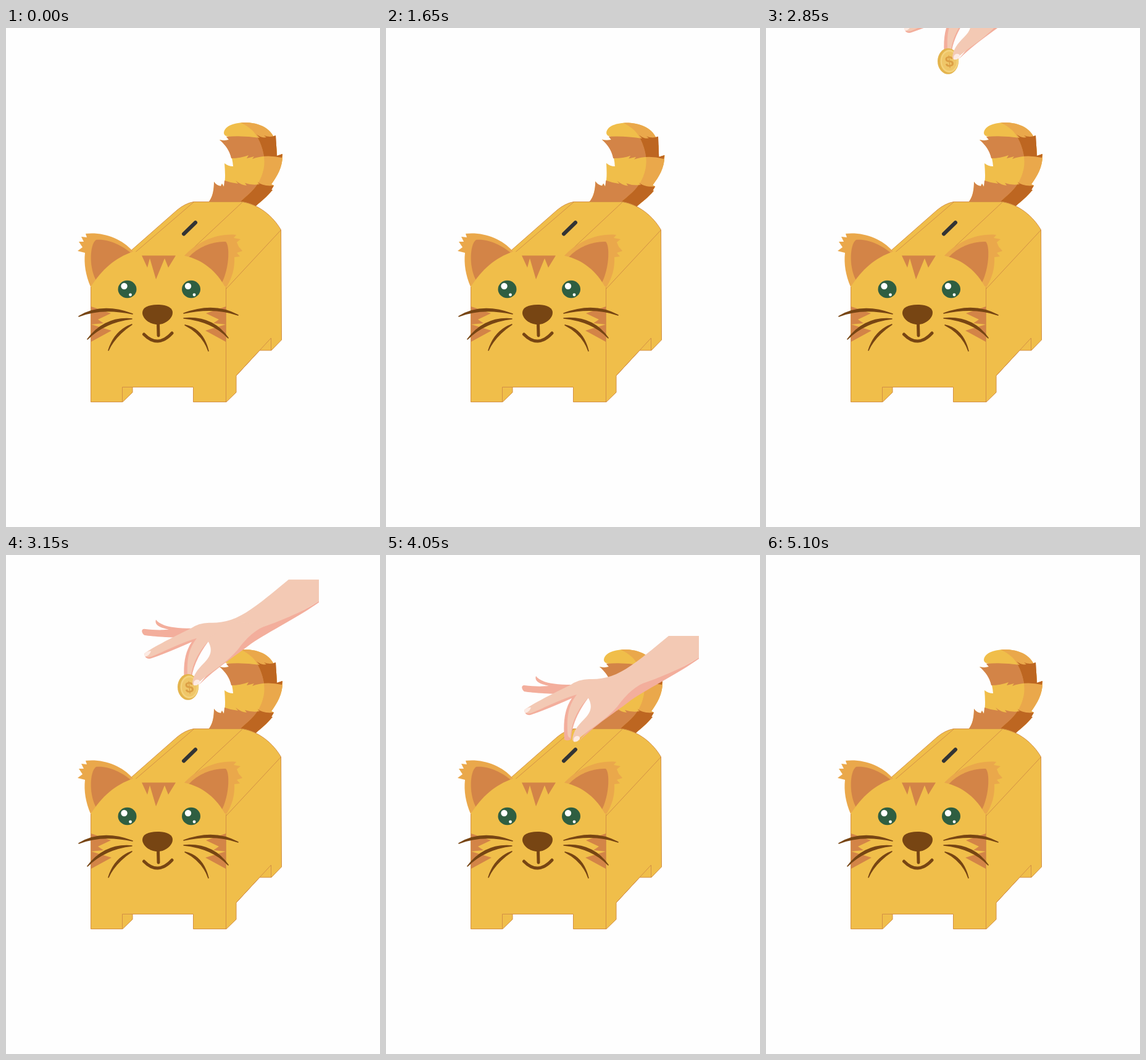
Write an HTML page that moves like this. It is 606 by 808 pixels and loops after 5250 ms.

```html
<!DOCTYPE html>
<html lang="en">
<head>
<meta charset="utf-8">
<title>Cat money box</title>
<style>
  html, body { margin: 0; width: 100%; height: 100%; overflow: hidden; background: #fefefe; }
  svg { display: block; width: 100vw; height: 100vh; }
  .fur { fill: #f0be4a; }
  .edge { fill: #eaa84b; }
  .stripe { fill: #d38447; }
  .dark { fill: #bd6621; }
  .line { fill: none; stroke: #d38f45; stroke-width: 1; }
  .brown { fill: #774513; }
  .mouth { fill: none; stroke: #774513; stroke-width: 5; stroke-linecap: round; }
  .skin { fill: #f3c9b4; }
  .pink { fill: #f3ae9c; }
  .nail { fill: #fdebe4; }
</style>
</head>
<body>
<svg viewBox="0 0 606 808">
  <defs>
    <clipPath id="shade">
      <path d="M373 150 C397 160 405 170 411 184 C420 205 421 222 414 240 C406 260 394 268 379 282 L360 310 H470 V150Z"/>
    </clipPath>
    <path id="tailShape" d="M353 170 C354 158 371 153 389 153 C417 154 435 167 438 190 L439 207 L448 204 C449 224 440 239 430 253 L434 255 L430 262 L432 262 C422 274 414 280 405 288 L392 306 H326 L329 292 L318 288 L329 281 C335 273 337 262 337 249 Q341 255 348 256 L350 252 L353 257 C356 245 355 232 354 219 Q360 224 368 224 C367 206 360 192 346 181 Q353 183 361 181 L357 176 L361 176 Q353 175 353 170Z"/>
    <path id="bandTop" d="M346 181 Q353 183 361 181 L357 176 Q385 174 411 178 L406 172 Q414 179 422 177 L418 174 Q428 178 437 174 L439 207 L448 204 L447 210 Q420 204 399 212 L402 208 L390 211 L393 206 Q380 211 365 211 C362 198 356 190 346 181Z"/>
    <path id="bandLow" d="M318 288 L329 281 C335 273 337 262 337 249 Q341 255 348 256 L350 252 L353 257 L354 247 Q365 251 376 252 L372 247 Q380 254 390 255 L387 251 Q398 255 411 253 L407 249 Q417 257 434 255 L430 262 L432 262 C422 274 414 280 405 288 L392 306 H320Z"/>
    <g id="eye">
      <ellipse rx="15" ry="14.3" fill="#2f5e41"/>
      <circle cx="-5" cy="-5" r="5.2" fill="#fff"/>
      <circle cx="5" cy="9" r="2.4" fill="#fff"/>
    </g>
  </defs>

  <g id="tail">
    <use href="#tailShape" class="fur"/>
    <use href="#bandTop" class="stripe"/>
    <use href="#bandLow" class="stripe"/>
    <g clip-path="url(#shade)">
      <use href="#tailShape" class="edge"/>
      <use href="#bandTop" class="dark"/>
      <use href="#bandLow" class="dark"/>
    </g>
  </g>

  <g id="box">
    <path class="fur" d="M203 360 L277 295 Q290 284 304 281.500 H383 C410 286 433 305 445.500 327 L446.500 505 L430 522 H411 L373 563 V590 L357 605.500 H303.500 V581.500 H205 V590 L189 605.500 H137.500 V419 L180 372Z"/>
    <path class="line" d="M203 360 L277 295 Q290 284 304 281.500 H383 C410 286 433 305 445.500 327 L446.500 505 L430 522 H411 L373 563 V590 L357 605.500 H303.500 V581.500 H188.500 V605.500 H137.500 V419 M205 581.500 V590 L189 605.500 M205 367 L304 282 M290 369 L383 282 M357 422 L445.500 327 M356.500 420 V605 M429.500 522 V502 L373 563"/>
    <path d="M288 333.500 L307 315" stroke="#333435" stroke-width="6" stroke-linecap="round"/>
  </g>

  <g id="ears">
    <path class="edge" d="M137 419 C129 400 126 382 128 364 L116 361 L124 355 L118 346 L126 346 L122 338 L131 339 L129 333 C157 330 187 340 206 362 L180 385Z"/>
    <path class="stripe" d="M148 412 C134 392 135 350 146 343 C165 341 188 352 202 364 L175 395Z"/>
    <path class="edge" d="M288 370 C309 347 340 332 373 335 L369 340 L380 342 L374 347 L377 354 L383 361 L374 364 L379 370 L370 371 C371 390 366 405 357 420 L325 395Z"/>
    <path class="stripe" d="M296 371 C312 354 335 345 356 346 C363 352 362 390 349 414 L320 398Z"/>
  </g>

  <g id="face">
    <path class="fur" d="M137.500 419 C155 391 177 372 206 362 L290 369 C318 375 341 393 356.500 422 V500 H137.500Z"/>
    <path class="stripe" d="M220 368.500 H275 L263 388 L257 373 L243 407 L233 373 L229 388Z"/>
    <path class="stripe" d="M138 451 L170 462 L149 472 L158 478 L138 480ZM138 480 L171 490 L138 508Z"/>
    <path class="stripe" d="M356 451 L324 462 L345 472 L336 478 L356 480ZM356 480 L323 490 L356 508Z"/>
    <path class="line" d="M137.500 419 V510 M356.500 422 V510"/>
    <use href="#eye" x="196.500" y="423"/>
    <use href="#eye" x="300" y="423"/>
    <path class="brown" d="M245.500 448 C261 448 270 453 270 461 C270 470 259 480 245.500 480 C232 480 221 470 221 461 C221 453 230 448 245.500 448Z"/>
    <path class="mouth" d="M246.500 478 L247 498 M223.500 496 Q246 519 269 494"/>
    <g id="whiskers" class="brown"></g>
  </g>

  <g id="hand">
    <path class="pink" d="M243 104 C249 113 268 118 300 118 L276 133 C253 132 235 131 224 129 C219 125 219 119 224 119 C240 121 253 121 264 120 C249 117 240 112 243 104Z"/>
    <path class="pink" d="M225 160 C224 164 228 168 234 167 C256 160 280 149 301 140 C289 158 287 178 289 207 Q295 210 300 206 C301 184 311 162 328 139 L302 118Z"/>
    <path class="skin" d="M458 39 H507 V74 C470 97 430 112 400 132 L340 160 L328 139 C312 155 300 178 299 204 Q294 205 294 193 C293 170 295 153 309 134 C290 139 259 154 235 164 Q224 166 224 159 C237 149 275 130 298 119 Q312 109 329 109 C352 110 373 104 397 87 C423 69 438 55 458 39Z"/>
    <path class="nail" d="M224 159 Q231 154 235 155 Q232 163 225 164Z"/>
    <g id="coin">
      <ellipse cx="295" cy="213" rx="17" ry="21" fill="#e4b44d"/>
      <ellipse cx="297" cy="213" rx="14.500" ry="18.500" fill="#f4d27c"/>
      <ellipse cx="297" cy="213" rx="12" ry="15.500" fill="#efc668"/>
      <text x="297" y="222" text-anchor="middle" font-family="Arial, 'Liberation Sans', sans-serif" font-size="25" font-weight="bold" fill="#dc9f45" transform="rotate(-6 297 213)">$</text>
    </g>
    <path class="pink" d="M507 74 V76 C475 99 428 122 397 143 C373 162 344 179 311 211 L350 165 C376 148 388 126 410 118 C445 106 475 94 507 74Z"/>
    <path class="skin" d="M325 135 C336 151 333 162 321 174 C310 185 303 194 302 207 Q304 213 310 208 C328 190 355 177 376 152 C390 133 405 119 425 112 L370 108Z"/>
    <path class="nail" d="M304 210 Q303 202 309 201 Q315 201 314 206 Q309 212 304 210Z"/>
  </g>
</svg>
<script>
const LOOP = 5250, STEP = 150;
const $ = id => document.getElementById(id);
const clamp = v => Math.min(1, Math.max(0, v));
const part = (t, from, to) => clamp((t - from) / (to - from));
const smooth = p => p * p * (3 - 2 * p);

// Each whisker: start, bend, end, thickness.
const whiskers = [
  [118, 467, 155, 447, 205, 463, 5],
  [132, 504, 160, 470, 204, 471, 6],
  [166, 522, 176, 493, 204, 480, 6],
  [376, 465, 337, 446, 288, 462, 5],
  [360, 502, 335, 469, 288, 470, 6],
  [328, 523, 319, 490, 290, 481, 6]
];
$('whiskers').innerHTML = whiskers.map(([x, y, bx, by, ex, ey, w]) =>
  `<path d="M${x} ${y} Q${bx} ${by - w / 2} ${ex} ${ey} Q${bx} ${by + w} ${x} ${y}Z"
    stroke="#774513" stroke-width="1.6" stroke-linejoin="round"/>`).join('');

const REST = 92, TRAVEL = 361;

function draw(t) {
  const swing = smooth(part(t, 1500, 2250)) - smooth(part(t, 2250, 2700));
  $('tail').setAttribute('transform', `rotate(${12.6 * swing} 365.5 349)`);

  const enter = 1 - part(t, 2700, 3605);
  const leave = part(t, 4112, 5020);
  const y = REST - TRAVEL * (enter ** 2 + leave ** 2);
  $('hand').setAttribute('transform', `translate(0 ${y})`);
  $('hand').style.display = t < 2700 || t >= 4950 ? 'none' : '';
  $('coin').style.display = t < 3937 ? '' : 'none';
}

const start = performance.now();
function tick() {
  const t = (performance.now() - start) % LOOP;
  draw(Math.floor(t / STEP) * STEP);
  requestAnimationFrame(tick);
}
tick();
</script>
</body>
</html>
```
